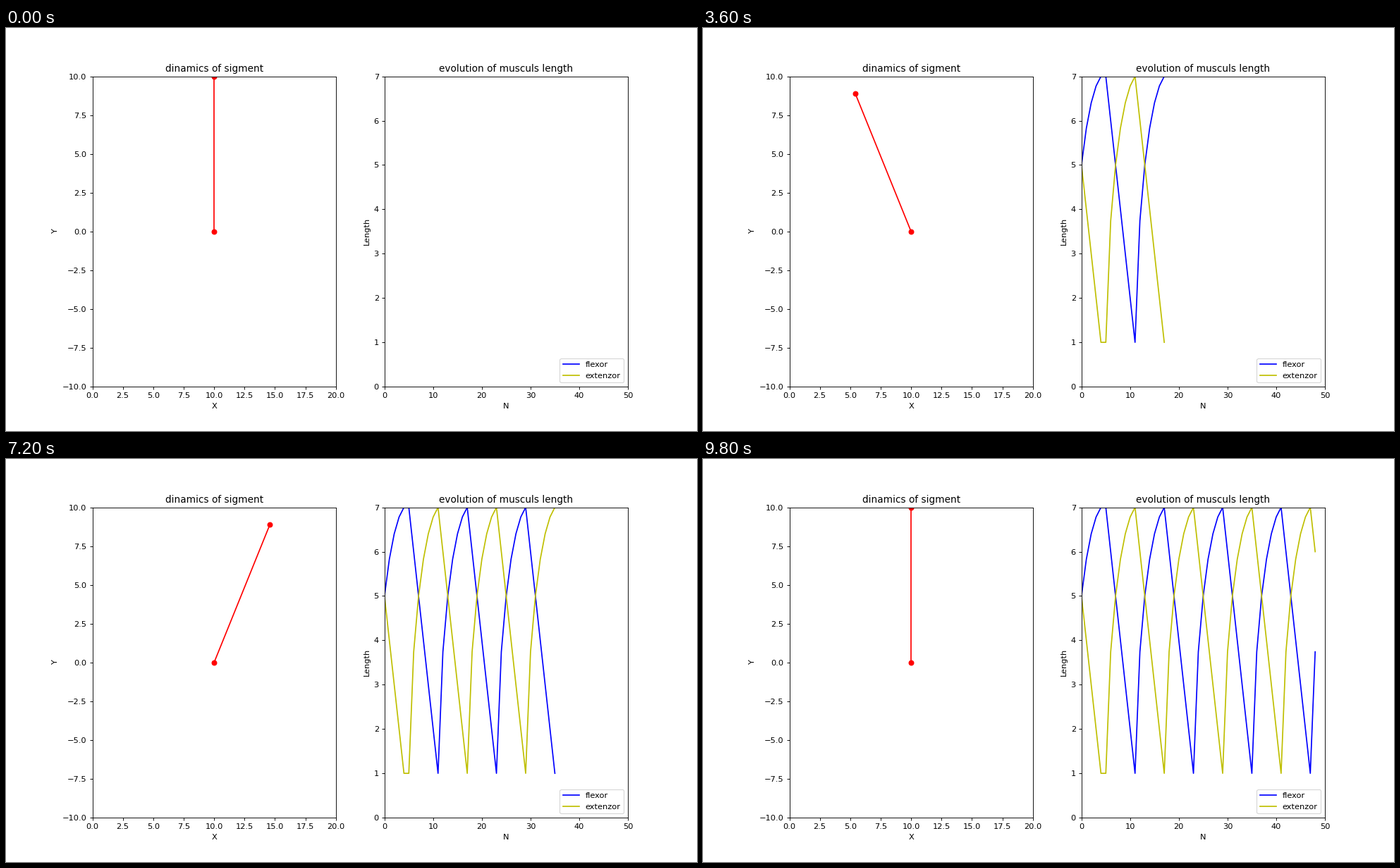
Write a matplotlib script that moves like this. It is 980 by 572 pixels and loops after 10000 ms.

```python
import math

import matplotlib.pyplot as plt
from matplotlib.animation import FuncAnimation

STEPS = 50
BONE = 10            # segment length
A, B = 3, 4          # distances of the muscle anchors from the joint
PIVOT = (10, 0)


def opposite(length):
    """Length of the muscle on the other side of the joint."""
    return math.sqrt(2 * (A * A + B * B) - length * length)


def muscles(n):
    """Flexor and extensor lengths at step n; one contracts by 1 per step."""
    if n < 5:
        ext = 5 - n
        return opposite(ext), ext
    half, k = divmod(n - 5, 6)
    active = A + B - k
    pair = active, opposite(active)
    return pair if half % 2 == 0 else pair[::-1]


def tip(n):
    ext = muscles(n)[1]
    c = (A * A + B * B - ext * ext) / (2 * A * B)
    s = math.sqrt(max(0, 1 - c * c))
    return PIVOT[0] - BONE * c, PIVOT[1] + BONE * s


lengths = [muscles(n) for n in range(STEPS)]
flex, ext = zip(*lengths)

# 980 x 572 pixels
fig, (left, right) = plt.subplots(1, 2, figsize=(12, 7.0041), dpi=980 / 12)

left.set(xlim=(0, 20), ylim=(-10, 10), xlabel="X", ylabel="Y",
         title="dinamics of sigment")
right.set(xlim=(0, 50), ylim=(0, 7), xlabel="N", ylabel="Length",
          title="evolution of musculs length")

bone, = left.plot([], [], "ro-")
flex_line, = right.plot([], [], "b", label="flexor")
ext_line, = right.plot([], [], "y", label="extenzor")
right.legend(loc="lower right")


def draw(i):
    x, y = tip(i)
    bone.set_data([PIVOT[0], x], [PIVOT[1], y])
    flex_line.set_data(range(i), flex[:i])
    ext_line.set_data(range(i), ext[:i])
    return bone, flex_line, ext_line


anim = FuncAnimation(fig, draw, frames=STEPS, interval=200,
                     init_func=lambda: draw(0), repeat=True, repeat_delay=0)
plt.show()
```
